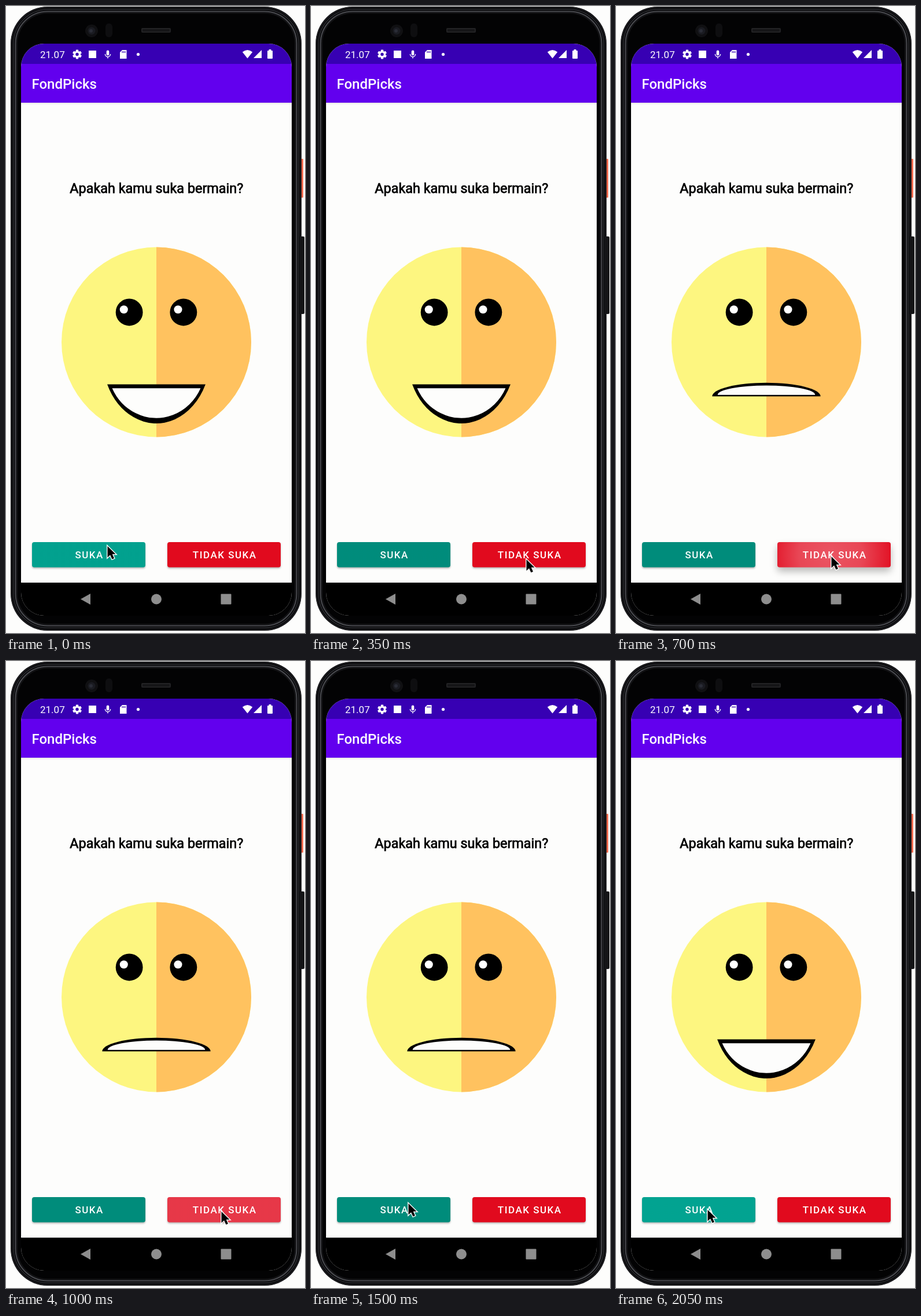
An HTML page with a canvas that plays this animation: 517x1083 px, repeating every 2100 ms.

```html
<!DOCTYPE html>
<html lang="id">
<head>
<meta charset="utf-8">
<title>FondPicks</title>
<style>
  html, body { margin: 0; width: 100%; height: 100%; overflow: hidden; background: #fdfdfd; }
  canvas { display: block; width: 517px; height: 1083px; }
</style>
</head>
<body>
<canvas id="stage" width="517" height="1083"></canvas>
<script>
const ctx = document.getElementById('stage').getContext('2d');
const LOOP = 2100, STEP = 50;
const PRESS_NO = 600, PRESS_YES = 1680, HOLD = 80;
const PAPER = '#fdfdfc';

// Cursor tip: time, x, y
const PATH = [
  [0, 174, 930], [50, 192, 931], [300, 371, 953], [450, 371, 953], [550, 371, 948],
  [1050, 371, 948], [1250, 199, 921], [1500, 167, 934], [1650, 157, 945], [2100, 157, 945]
];

const clamp = v => Math.max(0, Math.min(1, v));

function box(x, y, w, h, r, fill) {
  ctx.beginPath();
  ctx.roundRect(x, y, w, h, r);
  ctx.fillStyle = fill;
  ctx.fill();
}

function ring(inset, width, color) {
  ctx.beginPath();
  ctx.roundRect(8 + inset, 1 + inset, 503 - 2 * inset, 1078 - 2 * inset, 64 - inset);
  ctx.lineWidth = width;
  ctx.strokeStyle = color;
  ctx.stroke();
}

function disc(x, y, r, fill) {
  ctx.beginPath();
  ctx.arc(x, y, r, 0, Math.PI * 2);
  ctx.fillStyle = fill;
  ctx.fill();
}

// Filled slice of an ellipse centred on x = 0, closed by its chord
function slice(y, rx, ry, from, to, fill) {
  const rad = Math.PI / 180;
  ctx.beginPath();
  ctx.ellipse(0, y, rx, ry, 0, from * rad, to * rad);
  ctx.fillStyle = fill;
  ctx.fill();
}

function poly(points, fill) {
  ctx.beginPath();
  points.forEach(([x, y]) => ctx.lineTo(x, y));
  ctx.closePath();
  ctx.fillStyle = fill;
  ctx.fill();
}

function label(text, x, y, font, color, align = 'left', spacing = 0) {
  ctx.font = font + ' Roboto, sans-serif';
  ctx.letterSpacing = spacing + 'px';
  ctx.textAlign = align;
  ctx.fillStyle = color;
  ctx.fillText(text, x, y);
  ctx.letterSpacing = '0px';
}

function shadow(y, blur, alpha) {
  ctx.shadowColor = `rgba(0,0,0,${alpha})`;
  ctx.shadowOffsetY = y;
  ctx.shadowBlur = blur;
}

function drawBody() {
  box(508, 264, 6, 67, 1, '#f46a4e');
  box(509, 398, 7, 134, 2, '#141416');
  box(8, 1, 503, 1078, 64, '#08080a');
  ring(1.5, 2, '#1c1c1f');
  ring(5, 1.5, '#2b2c30');
  ring(8.5, 2, '#4a4b50');
  ring(11, 1.5, '#151517');
  box(20.5, 13.5, 478, 1053, 51, '#030304');

  disc(148, 43, 11, '#101012');
  disc(148, 43, 6.5, '#1a1b21');
  disc(147, 43, 3, '#292b35');
  box(172, 30, 12, 24, 6, '#0e0e10');
  box(234, 38, 51, 8, 2, '#222224');
  box(236, 40, 47, 4, 1, '#151517');
}

function drawGear(x, y) {
  ctx.save();
  ctx.translate(x, y);
  for (let i = 0; i < 6; i++) {
    box(-2.2, -8, 4.4, 5, 1, '#fff');
    ctx.rotate(Math.PI / 3);
  }
  disc(0, 0, 6, '#fff');
  disc(0, 0, 2.7, '#3700b3');
  ctx.restore();
}

function drawMic(x, y) {
  box(x - 2.3, y - 7, 4.6, 9, 2.3, '#fff');
  ctx.beginPath();
  ctx.arc(x, y - 0.5, 4.6, 0, Math.PI);
  ctx.moveTo(x, y + 4);
  ctx.lineTo(x, y + 7);
  ctx.lineWidth = 1.4;
  ctx.strokeStyle = '#fff';
  ctx.stroke();
}

function drawStatus() {
  ctx.fillStyle = '#3700b3';
  ctx.fillRect(26, 65, 468, 35);
  label('21.07', 59, 89.5, '400 17px', '#fff');
  drawGear(123, 83.5);
  box(143, 77, 13, 13, 0, '#fff');
  drawMic(176, 83.5);
  poly([[201, 76], [208.5, 76], [208.5, 91], [197, 91], [197, 80]], '#fff');
  for (let i = 0; i < 3; i++) box(200.5 + i * 2.4, 78, 1.2, 3, 0, '#3700b3');
  disc(228.5, 83.5, 2.6, '#fff');

  ctx.beginPath();
  ctx.moveTo(417.5, 90.5);
  ctx.lineTo(408.8, 79.5);
  ctx.quadraticCurveTo(417.5, 72.5, 426.2, 79.5);
  ctx.fillStyle = '#fff';
  ctx.fill();
  poly([[442, 76], [442, 90], [428, 90]], '#fff');
  box(452, 77, 9, 14, 1, '#fff');
  box(454.5, 75, 4, 3, 0, '#fff');
}

// The face is laid out around its centre with a head radius of 350.
function drawFace(happy) {
  ctx.save();
  ctx.translate(260, 580.5);
  ctx.scale(164 / 350, 164 / 350);
  disc(0, 0, 350, '#fdf680');
  slice(0, 350, 350, -90, 90, '#ffc25f');
  for (const x of [-100, 100]) {
    disc(x, -110, 50, '#000');
    disc(x - 20, -120, 15, '#fff');
  }
  if (happy) {
    slice(50, 200, 250, 25, 155, '#000');
    slice(90, 180, 190, 25, 155, PAPER);
  } else {
    slice(200, 200, 50, 180, 360, '#000');
    slice(195, 180, 35, 180, 360, PAPER);
  }
  ctx.restore();
}

// Ripple spreads from the pointer, then fades evenly over the button.
function drawRipple(x, y, age, px, py, rgb) {
  if (age < 0 || age > 780) return;
  const grow = clamp(age / 300);
  const fade = 1 - clamp((age - 300) / 480);
  const reach = 80 + 270 * grow * grow;
  const peak = (0.24 + 0.1 * (1 - grow)) * fade;
  const g = ctx.createRadialGradient(px, py, 0, px, py, reach);
  g.addColorStop(0, `rgba(${rgb},${peak})`);
  g.addColorStop(0.5, `rgba(${rgb},${peak * (0.7 + 0.3 * grow)})`);
  g.addColorStop(1, `rgba(${rgb},${peak * grow ** 3})`);
  box(x, y, 196, 43.5, 4, g);
}

function drawButton(x, text, color, glow, age, px, py) {
  const y = 926;
  const lift = age < 0 ? 0 : clamp(age / 100) * (1 - clamp((age - HOLD - 50) / 100));
  ctx.save();
  shadow(2 + 5 * lift, 3 + 10 * lift, 0.28);
  box(x, y, 196, 43.5, 4, color);
  ctx.restore();
  drawRipple(x, y, age, px, py, glow);
  label(text, x + 99.2, 954, '500 17px', '#fff', 'center', 1.5);
}

function drawCursor(x, y) {
  const shape = [[0, 0], [0, 17], [4, 13.2], [6.9, 19.6], [10, 18.2], [7.2, 12], [12.2, 12]];
  ctx.save();
  ctx.translate(x + 1.5, y + 3);
  ctx.scale(1.15, 1.15);
  poly(shape, '#000');
  ctx.lineJoin = 'miter';
  ctx.lineWidth = 2.4;
  ctx.strokeStyle = '#fff';
  ctx.stroke();
  poly(shape, '#000');
  ctx.restore();
}

function cursorAt(t) {
  const i = PATH.findIndex(p => p[0] > t);
  const [t0, x0, y0] = PATH[i - 1], [t1, x1, y1] = PATH[i];
  const u = (t - t0) / (t1 - t0);
  const k = u * u * (3 - 2 * u);
  return [x0 + (x1 - x0) * k, y0 + (y1 - y0) * k];
}

function drawNav() {
  ctx.fillStyle = '#000';
  ctx.fillRect(26, 996, 468, 57);
  poly([[129, 1024.5], [146, 1015], [146, 1034]], '#8e8e8e');
  disc(260, 1024.5, 9, '#8e8e8e');
  box(371.5, 1015.5, 18, 18, 1, '#8e8e8e');
}

function draw(t) {
  const happy = t < PRESS_NO + HOLD || t >= PRESS_YES + HOLD;
  const yesAge = t < PRESS_NO ? t + LOOP - PRESS_YES : t - PRESS_YES;
  ctx.fillStyle = PAPER;
  ctx.fillRect(0, 0, 517, 1083);
  drawBody();

  ctx.save();
  ctx.beginPath();
  ctx.roundRect(26, 65, 468, 988, 40);
  ctx.clip();
  ctx.fillStyle = PAPER;
  ctx.fillRect(26, 65, 468, 988);
  ctx.save();
  shadow(1, 3, 0.15);
  ctx.fillStyle = '#6200ee';
  ctx.fillRect(26, 100, 468, 67);
  ctx.restore();
  drawStatus();
  label('FondPicks', 44.5, 143, '500 24px', '#fff');

  const ask = 'Apakah kamu suka bermain?';
  label(ask, 260.3, 323, '400 23.4px', '#000', 'center');
  ctx.lineWidth = 0.75;
  ctx.strokeStyle = '#000';
  ctx.strokeText(ask, 260.3, 323);

  drawFace(happy);
  drawButton(45, 'SUKA', '#008c7b', '10,255,230', yesAge, 157, 945);
  drawButton(279, 'TIDAK SUKA', '#e10a1e', '255,255,255', t - PRESS_NO, 371, 948);
  drawNav();
  ctx.restore();
  drawCursor(...cursorAt(t));
}

function tick() {
  const t = performance.now() % LOOP;
  draw(Math.floor(t / STEP) * STEP);
  requestAnimationFrame(tick);
}
tick();
</script>
</body>
</html>
```
